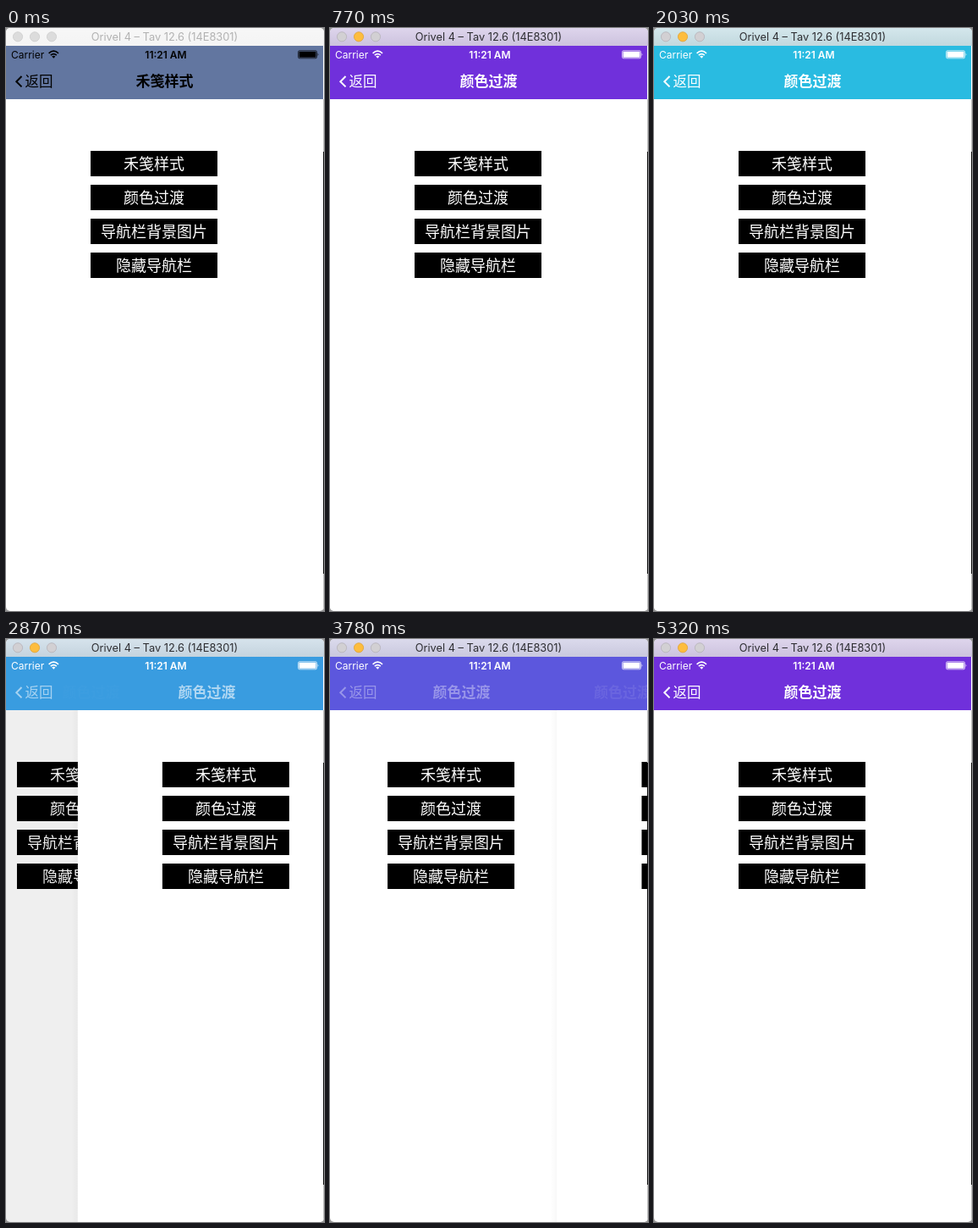
An HTML page for the animation above (5.39 s loop, 376 by 688 pixels).

```html
<!DOCTYPE html>
<html lang="zh-CN">
<head>
<meta charset="utf-8">
<style>
html, body { margin: 0; width: 100%; height: 100%; overflow: hidden; background: #9a9a9a; }
svg { display: block; width: 376px; height: 688px; }
text { font-family: Inter, "Noto Sans CJK SC", "Noto Sans CJK", sans-serif; }
.mid { text-anchor: middle; }
.cjk { font-family: "Noto Sans CJK SC", "Noto Sans CJK", sans-serif; }
.title { font-size: 17px; font-weight: 600; }
</style>
</head>
<body>
<svg viewBox="0 0 376 688">
  <defs>
    <linearGradient id="chrome" x2="0" y2="1">
      <stop id="chromeTop"/><stop id="chromeBottom" offset="1"/>
    </linearGradient>
    <linearGradient id="edge">
      <stop stop-color="#000" stop-opacity="0"/><stop offset="1" stop-color="#000" stop-opacity=".18"/>
    </linearGradient>
    <clipPath id="window"><rect width="376" height="688" rx="5"/></clipPath>
    <clipPath id="screen"><rect width="375" height="688"/></clipPath>
  </defs>
  <g clip-path="url(#window)">
    <rect width="376" height="688" fill="#fff"/>
    <g clip-path="url(#screen)">
      <g id="under"></g>
      <rect id="dim" y="84" height="604"/>
      <rect id="shadow" y="84" width="8" height="604" fill="url(#edge)"/>
      <g id="over"><rect y="84" width="376" height="604" fill="#fff"/></g>

      <rect id="bar" y="21" width="375" height="63"/>
      <rect id="barDim" y="21" height="63"/>
      <rect id="barOver" y="21" width="375" height="63"/>
      <text id="oldTitle" class="mid cjk title" y="69"></text>
      <text id="newTitle" class="mid cjk title" y="69"></text>
      <g id="back">
        <path d="M18.5 57L12.3 63.2L18.5 69.4" fill="none" stroke="currentColor" stroke-width="2"/>
        <text class="cjk" x="22.5" y="69" font-size="16.5" fill="currentColor">返回</text>
      </g>
    </g>

    <g id="status" fill="currentColor">
      <text x="6" y="35.5" font-size="12">Carrier</text>
      <g fill="none" stroke="currentColor" stroke-width="1.7">
        <path d="M50.6 29.8Q56.3 24.6 62 29.8M52.8 32.2Q56.3 29.1 59.8 32.2"/>
      </g>
      <path d="M54.2 33.6Q56.3 31.8 58.4 33.6L56.3 35.8Z"/>
      <text class="mid" x="189" y="35.5" font-size="12" font-weight="600">11:21 AM</text>
      <rect x="345.5" y="26.8" width="22" height="9" rx="1.5" fill="none" stroke="currentColor" stroke-width=".7"/>
      <rect x="346.5" y="27.8" width="20" height="7" rx=".6"/>
      <path d="M368.7 29.6q1.5 1.7 0 3.4z"/>
    </g>

    <rect width="376" height="21" fill="url(#chrome)"/>
    <g id="lights" stroke="#bdbdbd" stroke-width=".8"></g>
    <text id="caption" class="mid" x="187.5" y="15" font-size="12.8">Orivel 4 – Tav 12.6 (14E8301)</text>
    <path d="M375.5 84V688" stroke="#c4c4c4"/>
    <path d="M375.5 146V644" stroke="#111"/>
  </g>
</svg>
<script>
const LOOP = 5390, STEP = 70, WIDTH = 375, PARALLAX = 112.5;
const labels = ['禾笺样式', '颜色过渡', '导航栏背景图片', '隐藏导航栏'];
const slate = { color: [98, 118, 160], title: labels[0], ink: '#000' };
const purple = { color: [112, 48, 219], title: labels[1], ink: '#fff' };
const cyan = { color: [41, 187, 225], title: labels[1], ink: '#fff' };

const $ = id => document.getElementById(id);
const set = (id, attrs) => {
  for (const key in attrs) $(id).setAttribute(key, attrs[key]);
};
const clamp = v => Math.max(0, Math.min(1, v));
const mix = (a, b, k) => a.map((v, i) => v + (b[i] - v) * k);
const rgb = c => `rgb(${c.map(Math.round)})`;
const gray = v => [v, v, v];

const buttons = labels.map((label, i) => `
  <rect x="100" y="${145 + i * 40}" width="150" height="30"/>
  <text class="mid cjk" x="175" y="${166.7 + i * 40}" font-size="18" fill="#fff">${label}</text>`).join('');
$('under').innerHTML = buttons;
$('over').insertAdjacentHTML('beforeend', buttons);
$('lights').innerHTML = [14, 34, 54].map(x => `<circle cx="${x}" cy="10.3" r="5.6"/>`).join('');

// Critically damped spring used by pushed pages.
function spring(ms) {
  const w = Math.max(0, ms) * 0.014;
  const p = 1 - (1 + w) * Math.exp(-w);
  return p > 0.995 ? 1 : p;
}

// Left edge of the page while it is dragged away and released.
function dragX(t) {
  if (t < 3290) return 227.5 * clamp((t - 2620) / 670);
  if (t < 4270) return 227.5 + 82 * (t - 3290) / 980;
  return 309.5 + 65.5 * (1 - (1 - clamp((t - 4270) / 400)) ** 2);
}

function scene(t) {
  if (t < 1183) return { from: slate, to: purple, p: spring(t - 191), slide: true };
  if (t < 2620) return { from: purple, to: cyan, p: spring(t - 1183), tint: clamp((t - 1183) / 108) };
  const p = 1 - dragX(t) / WIDTH;
  return { from: purple, to: cyan, p, tint: p, pop: true };
}

function draw(t) {
  const { from, to, p, slide, tint, pop } = scene(t);
  const x = WIDTH * (1 - p), shift = -PARALLAX * p;
  const active = t >= 210;
  const barColor = slide ? from.color : mix(from.color, to.color, tint);
  const chromeColor = slide ? to.color : barColor;
  const moving = p > 0 && p < 1;

  set('under', { transform: `translate(${shift})` });
  set('over', { transform: `translate(${x})` });
  // The page below darkens in coarse steps.
  set('dim', { width: x, opacity: Math.floor(2.72 * p) / 32 });
  set('shadow', { x: x - 8, opacity: moving ? (pop ? 0.15 : 1 - p) : 0 });

  set('bar', { fill: rgb(barColor) });
  set('barDim', { width: x, opacity: slide ? 0.07 * p : 0 });
  set('barOver', { x, fill: rgb(to.color), opacity: slide ? 1 : 0 });

  const fadeOut = (1 - p) ** (pop ? 3 : 2);
  set('oldTitle', { x: 187.5 + shift, fill: from.ink, opacity: fadeOut });
  set('newTitle', { x: 187.5 + x * (pop ? 0.59 : 0.66), fill: to.ink, opacity: p ** (pop ? 2 : 1.3) });
  $('oldTitle').textContent = from.title;
  $('newTitle').textContent = to.title;
  set('back', { color: p < 0.5 ? from.ink : to.ink, opacity: Math.max(fadeOut, clamp(2 * p - 1)) });
  set('status', { color: active ? '#fff' : '#000' });

  set('chromeTop', { 'stop-color': active ? rgb(mix(gray(238), chromeColor, 0.13)) : '#f7f7f7' });
  set('chromeBottom', { 'stop-color': active ? rgb(mix(gray(222), chromeColor, 0.16)) : '#f4f4f4' });
  set('caption', { fill: active ? '#2e2e32' : '#b2b2b2' });
  [...$('lights').children].forEach((light, i) => {
    const lit = active && i === 1;
    light.setAttribute('fill', lit ? '#fdbd3e' : active ? '#d2d0d3' : '#dcdcdc');
    light.setAttribute('stroke', lit ? '#dfa136' : active ? '#b5b2b8' : '#cdcdcd');
  });
}

const start = performance.now();
function tick() {
  const t = (performance.now() - start) % LOOP;
  draw(Math.floor(t / STEP) * STEP);
  requestAnimationFrame(tick);
}
tick();
</script>
</body>
</html>
```
